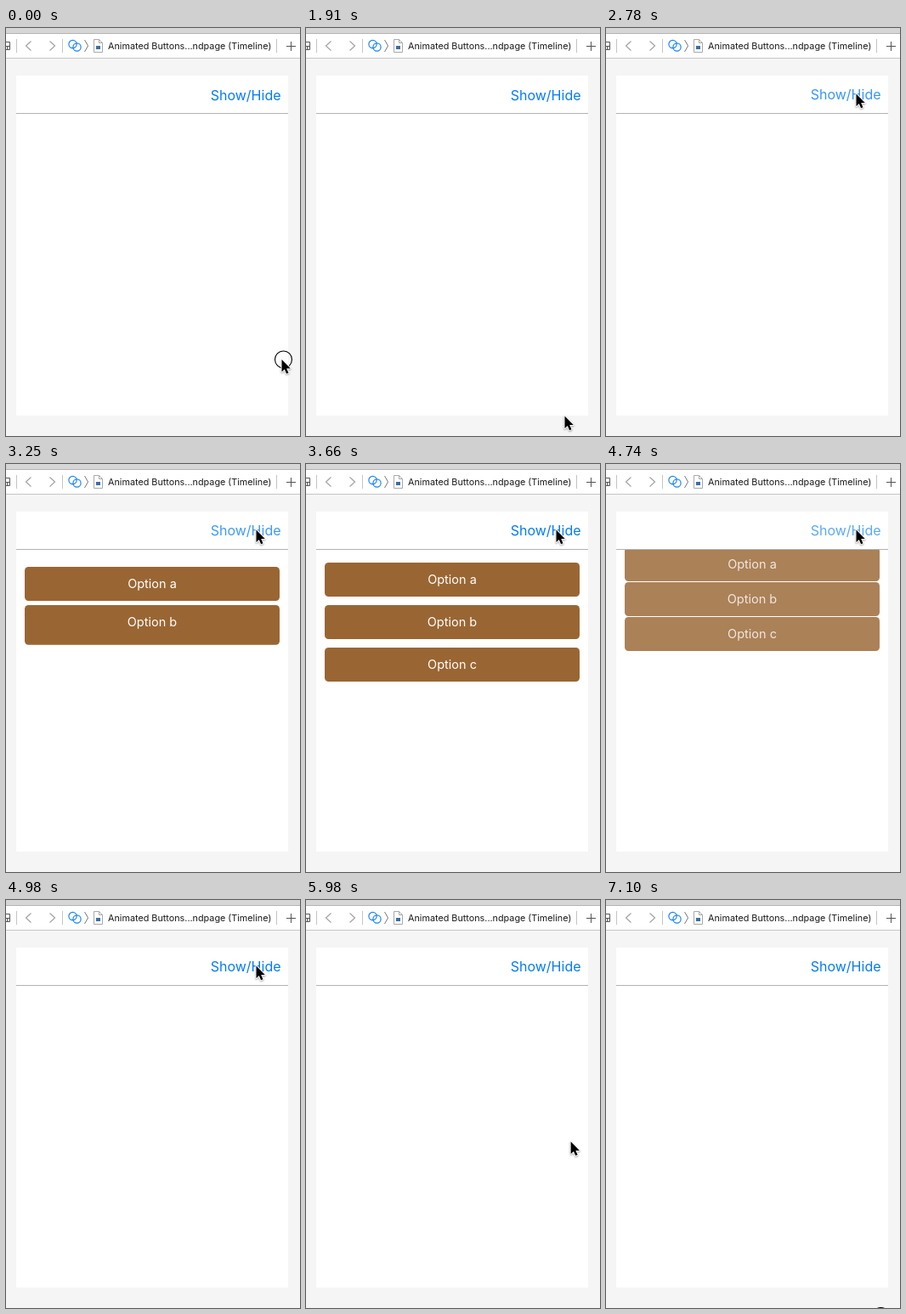
An HTML page with a canvas that plays this animation: 346 by 480 pixels, repeating every 7170 ms.

```html
<!DOCTYPE html>
<html lang="en">
<head>
<meta charset="utf-8">
<title>Animated buttons</title>
<style>
html, body { margin: 0; width: 100%; height: 100%; overflow: hidden; background: #f5f5f5; }
canvas { display: block; width: 346px; height: 480px; }
</style>
</head>
<body>
<canvas id="stage" width="346" height="480"></canvas>
<script>
const ctx = document.getElementById('stage').getContext('2d');
const LOOP = 7170;
const FONT = 'Inter, Roboto, sans-serif';
const BLUE = '#007aff';
const clamp = v => Math.max(0, Math.min(1, v));
const smooth = v => { v = clamp(v); return v * v * (3 - 2 * v); };

// Index of the held step within a stretch of n equal intervals
const stepOf = (t, from, to, n) =>
  Math.min(n, Math.floor((t - from) * n / (to - from) + 1e-6));
const held = (t, from, to, n) =>
  from + stepOf(t, from, to, n) * (to - from) / n;

function rect(x, y, w, h, color) {
  ctx.fillStyle = color;
  ctx.fillRect(x, y, w, h);
}

function line(points, color, width = 1, close = false) {
  ctx.beginPath();
  points.forEach(([x, y]) => ctx.lineTo(x, y));
  if (close) ctx.closePath();
  ctx.strokeStyle = color;
  ctx.lineWidth = width;
  ctx.stroke();
}

function ring(x, y, r, color, width) {
  ctx.beginPath();
  ctx.arc(x, y, r, 0, Math.PI * 2);
  ctx.strokeStyle = color;
  ctx.lineWidth = width;
  ctx.stroke();
}

function text(str, x, y, size, color, align = 'left') {
  ctx.font = `${size}px ${FONT}`;
  ctx.textAlign = align;
  ctx.fillStyle = color;
  ctx.fillText(str, x, y);
}

function toolbar() {
  rect(0, 0, 346, 6, '#d6d6d6');
  rect(0, 6, 346, 1, '#b4b4b4');
  rect(0, 7, 346, 28, '#fff');
  rect(0, 35, 346, 1, '#c6c6c6');

  line([[-1, 16.5], [4.5, 16.5], [4.5, 25.5], [-1, 25.5]], '#555');
  line([[-1, 21.5], [4, 21.5]], '#555');
  line([[1.5, 21], [1.5, 25]], '#555');
  for (const x of [12, 66, 318]) rect(x, 13, 1, 16, '#c4c4c4');

  line([[29.5, 15.5], [23.5, 21], [29.5, 26.5]], '#a3a3a3', 1.2);
  line([[51.5, 15.5], [57.5, 21], [51.5, 26.5]], '#a3a3a3', 1.2);
  ring(78.5, 19, 4.6, '#1683fb', 1.2);
  ring(83.5, 22.5, 4.6, '#1683fb', 1.2);
  line([[92.5, 14], [96.5, 21], [92.5, 28]], '#777');

  line([[103.5, 13.5], [109.5, 13.5], [113.5, 17.5], [113.5, 28.5], [103.5, 28.5]],
    '#a9a9a9', 1, true);
  line([[109.5, 13.5], [109.5, 17.5], [113.5, 17.5]], '#a9a9a9');
  rect(106, 21, 5, 4, '#3c6da5');

  text('Animated Buttons...ndpage (Timeline)', 120, 25, 10.8, '#1a1a1a');
  rect(330, 21, 11, 1, '#555');
  rect(335, 16, 1, 11, '#555');
}

// Opacity of the text button: dims on press, recovers on release
function labelAlpha(t) {
  const press = k => 1 - 0.2 * (k + 1);
  const release = ms => 0.2 + 0.8 * clamp(ms * 0.006);
  if (t < 2720) return 1;
  if (t < 3190) return press(stepOf(t, 2720, 2960, 3));
  if (t < 4440) return release(held(t, 3190, 3660, 8) - 3130);
  const q = held(t, 4440, 4980, 9);
  return q < 4680 ? press(stepOf(q, 4440, 4620, 3)) : release(q - 4646);
}

function spring(ms) {
  if (ms <= 0) return 0;
  const w = Math.PI / 110, d = 0.0273;
  return 1 - Math.exp(-d * ms) * (Math.cos(w * ms) + d / w * Math.sin(w * ms));
}

// How far button i has come out: 0 hidden, 1 in place
function shown(t, i) {
  if (t < 3190 || t >= 4980) return 0;
  if (t < 4440) return spring(held(t, 3190, 3660, 8) - 3140 - i * 27);
  return 1 - smooth((held(t, 4440, 4980, 9) - 4667) / 270);
}

function options(t) {
  ctx.save();
  ctx.beginPath();
  ctx.rect(12, 100, 320, 356);
  ctx.clip();
  for (let i = 2; i >= 0; i--) {
    const p = shown(t, i);
    if (p <= 0) continue;
    const y = 16 + (100 + 50 * i) * p;
    ctx.globalAlpha = clamp(t < 4440 ? p * 1.3 : p);
    ctx.beginPath();
    ctx.roundRect(22, y, 300, 40, 4.5);
    ctx.fillStyle = '#996633';
    ctx.fill();
    text('Option ' + 'abc'[i], 172, y + 25, 14.5, '#fff', 'center');
  }
  ctx.restore();
}

function pointerAt(t) {
  if (t < 60) return [324.5, 390];
  if (t < 120) return [321, 449];
  if (t < 1910) return null;
  if (t < 5750) {
    const u = stepOf(t, 1910, 2600, 12) / 12;
    const e = 1 - (1 - u) ** 2;
    return [304.5 - 10 * e + 8 * Math.sin(Math.PI * e), 456.5 - 379 * e];
  }
  if (t >= 6090) return null;
  const u = (stepOf(t, 5750, 6090, 6) + 1) / 7;
  return [294.5 + 24 * u, 77.5 + 405 * u * u];
}

function pointer(x, y) {
  ctx.save();
  ctx.translate(x, y);
  ctx.beginPath();
  [[0, 0], [0, 14.5], [3.3, 11.5], [5.6, 16.7], [8, 15.7], [5.7, 10.6], [10.3, 10.6]]
    .forEach(([px, py]) => ctx.lineTo(px, py));
  ctx.closePath();
  ctx.lineJoin = 'round';
  ctx.lineWidth = 2;
  ctx.strokeStyle = '#fff';
  ctx.shadowColor = 'rgba(0,0,0,.35)';
  ctx.shadowBlur = 2;
  ctx.shadowOffsetY = 1;
  ctx.stroke();
  ctx.shadowColor = 'transparent';
  ctx.fillStyle = '#000';
  ctx.fill();
  ctx.restore();
}

function draw(t) {
  rect(0, 0, 346, 480, '#f5f5f5');
  toolbar();
  rect(12, 56, 320, 400, '#fff');
  options(t);
  rect(12, 100, 320, 1, '#b2b2b2');

  ctx.globalAlpha = labelAlpha(t);
  text('Show/Hide', 323.5, t < 2720 ? 85 : 84, 16, BLUE, 'right');
  ctx.globalAlpha = 1;

  if (t < 60) ring(326.5, 390, 10, '#000', 1.1);
  if (t >= 7100) ring(323.5, 489.5, 10, '#000', 1.1);
  const at = pointerAt(t);
  if (at) pointer(...at);
}

const start = performance.now();
function tick() {
  draw((performance.now() - start) % LOOP);
  requestAnimationFrame(tick);
}
tick();
</script>
</body>
</html>
```
